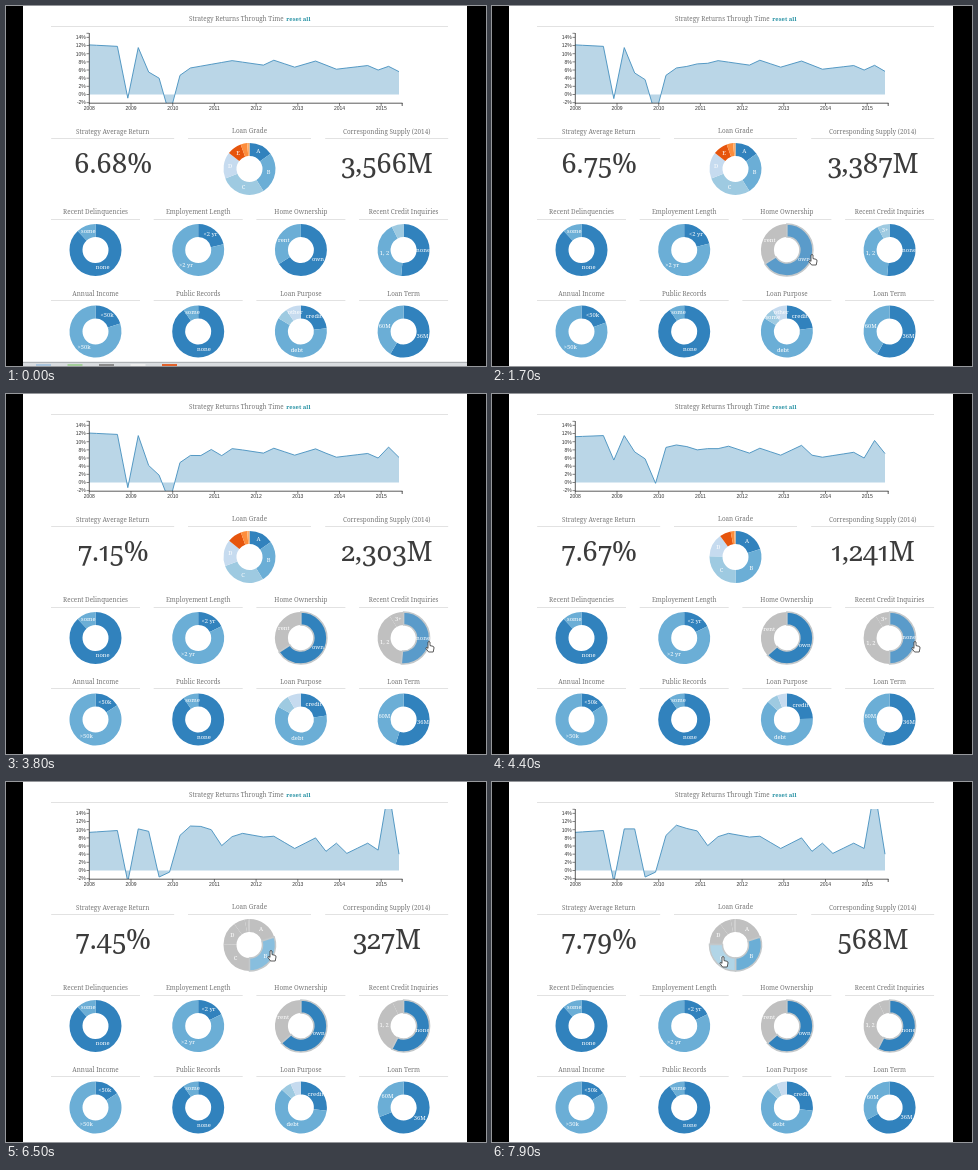
Recreate the animation shown at these times as an HTML page with a canvas. Size 480 by 360 pixels, loop 8000 ms.

```html
<!DOCTYPE html>
<html lang="en">
<head>
<meta charset="utf-8">
<title>Strategy dashboard</title>
<style>
  html, body { margin: 0; width: 100%; height: 100%; overflow: hidden; background: #000; }
  canvas { position: absolute; left: 0; top: 0; }
  .figure {
    position: absolute; top: 135.5px; width: 140px; text-align: center;
    font: 300 27.8px/40px "Noto Serif", serif; color: #3c3c3c;
    font-variant-numeric: oldstyle-nums proportional-nums;
  }
  #rate { left: 37.2px; }
  #supply { left: 311px; }
</style>
</head>
<body>
<canvas id="stage" width="480" height="360"></canvas>
<div class="figure" id="rate"></div>
<div class="figure" id="supply"></div>
<script>
const ctx = document.getElementById('stage').getContext('2d');
const rateBox = document.getElementById('rate');
const supplyBox = document.getElementById('supply');
const LOOP = 8000, STEP = 100, FADE = 750, HOVER_LAG = 200;
const SERIF = '"Noto Serif", serif', SANS = '"Liberation Sans", Arial, sans-serif';
const COLORS = ['#3182bd', '#6baed6', '#9ecae1', '#c6dbef', '#e6550d', '#fd8d3c', '#fdae6b'];
const RULE = '#e2e2e2', INK = '#333';
const PAGE = { x: 17, width: 444 };
const OUTER = 26, INNER = 13, QUARTERS = 31;

const gridPies = [
  ['late', 'Recent Delinquencies', 'none', 'some'],
  ['job', 'Employement Length', '<2 yr', '>2 yr'],
  ['home', 'Home Ownership', 'own', 'rent'],
  ['asks', 'Recent Credit Inquiries', 'none', '1, 2', '3+'],
  ['income', 'Annual Income', '<50k', '>50k'],
  ['record', 'Public Records', 'none', 'some'],
  ['purpose', 'Loan Purpose', 'credit', 'debt', 'some', 'other'],
  ['term', 'Loan Term', '36M', '60M'],
].map(([id, title, ...labels], i) => ({
  id, title, labels, width: 89,
  x: 89.5 + (i % 4) * 102.7,
  y: 244 + Math.floor(i / 4) * 81.5,
}));
const pies = [
  { id: 'grade', title: 'Loan Grade', labels: [...'ABCDEFG'], width: 123, x: 243.5, y: 163 },
  ...gridPies,
];

// A view holds the headline figures, the turning points of the return line
// (quarter: percent) and the inner slice boundaries of each pie.
const everything = {
  rate: 6.68, supply: 3566,
  line: { 0: 12.2, 3: 11.8, 4: -.9, 5: 11.5, 6: 5.5, 7: 4, 8: -5, 9: 4.7, 10: 6.5, 14: 8.3, 17: 7.2,
    18: 8.4, 20: 6.7, 22: 8.2, 24: 6.2, 27: 7.1, 28: 6, 29: 6.9, 30: 5.6 },
  cuts: { grade: [.15, .41, .69, .855, .945, .985], late: [.88], job: [.215], home: [.66],
    asks: [.515, .925], income: [.2], record: [.905], purpose: [.23, .835, .905], term: [.585] },
};
const refine = (base, changes) => ({
  ...base, ...changes,
  line: { ...base.line, ...changes.line },
  cuts: { ...base.cuts, ...changes.cuts },
});
const owners = refine(everything, {
  rate: 7.127, supply: 2356,
  line: { 4: -1.6, 6: 4, 7: 1.6, 11: 6.5, 12: 8.1, 13: 6.5, 29: 8.6, 30: 6.1 },
  cuts: { job: [.175], asks: [.515, .91], income: [.157], purpose: [.225, .83, .915], term: [.55] },
});
const careful = refine(owners, {
  rate: 7.67, supply: 1241,
  line: { 0: 11.2, 3: 11.5, 4: 5.5, 6: 7.5, 7: 5.8, 8: -.2, 9: 8.6, 10: 9.2, 11: 8.8, 12: 8, 13: 8.3,
    15: 8.9, 22: 9.1, 23: 6.7, 27: 7.4, 29: 10.3, 30: 7.1 },
  cuts: { grade: [.2, .5, .755, .9, .97, .992], home: [.635], asks: [.5, .91], purpose: [.245, .87, .94] },
});
const gradeB = refine(careful, {
  rate: 7.45, supply: 327,
  line: { 0: 9.3, 3: 9.8, 4: -2.8, 5: 10.2, 6: 9.6, 7: -1.6, 8: -.4, 10: 10.9, 11: 10.8, 12: 10, 13: 6.1,
    15: 9.1, 17: 8.2, 20: 5.4, 22: 8, 23: 4.7, 24: 6.7, 25: 4.2, 27: 6.7, 28: 5, 29: 20, 30: 4 },
  cuts: { asks: [.575, .93], purpose: [.27, .87, .935], term: [.69] },
});
const gradeBC = refine(gradeB, {
  rate: 7.79, supply: 568,
  line: { 6: 10.2, 10: 11.1, 11: 10.3, 12: 9.7, 28: 5.4 },
  cuts: { term: [.67] },
});

const clicks = [
  { at: -FADE, view: everything, chosen: {} },
  { at: 1450, view: owners, chosen: { home: [0] } },
  { at: 3629, view: careful, chosen: { home: [0], asks: [0] } },
  { at: 5750, view: gradeB, chosen: { home: [0], asks: [0], grade: [1] } },
  { at: 7150, view: gradeBC, chosen: { home: [0], asks: [0], grade: [1, 2] } },
];

// Pointer moves: start, end, and where the tip comes to rest.
const moves = [[100, 650, 320, 249], [2450, 3400, 423, 248], [5000, 5500, 257, 148],
  [5550, 5750, 265, 169], [6850, 7100, 231, 175]];

const mix = (a, b, p) => a + (b - a) * p;
const mixAll = (a, b, p) => a.map((v, i) => mix(v, b[i], p));
const progress = (t, from, to) => Math.min(1, Math.max(0, (t - from) / (to - from)));
const cubic = p => p < .5 ? 4 * p ** 3 : 1 - 4 * (1 - p) ** 3;
const sine = p => (1 - Math.cos(Math.PI * p)) / 2;

function pointerAt(t) {
  return moves.reduce((tip, [from, to, x, y]) => {
    const p = sine(progress(t, from, to));
    return { x: mix(tip.x, x, p), y: mix(tip.y, y, p) };
  }, { x: 190, y: 364 });
}

function quarterly(turns) {
  const at = Object.keys(turns).map(Number);
  return Array.from({ length: QUARTERS }, (_, q) => {
    const next = at.find(k => k >= q), last = at.findLast(k => k <= q);
    return next === last ? turns[q] : mix(turns[last], turns[next], (q - last) / (next - last));
  });
}

function write(text, x, y, font, color, align = 'center') {
  ctx.font = font;
  ctx.fillStyle = color;
  ctx.textAlign = align;
  ctx.fillText(text, x, y);
}

function segment(x0, y0, x1, y1, color, width = 1) {
  ctx.beginPath();
  ctx.moveTo(x0, y0);
  ctx.lineTo(x1, y1);
  ctx.strokeStyle = color;
  ctx.lineWidth = width;
  ctx.stroke();
}

function heading(text, x, y, width) {
  write(text, x, y, `6.33px ${SERIF}`, '#777');
  const rule = Math.floor(y + 5) + .5;
  segment(x - width / 2, rule, x + width / 2, rule, RULE);
}

function headings() {
  write('Strategy Returns Through Time', 183, 15.3, `6.33px ${SERIF}`, '#777', 'left');
  write('reset all', 304.5, 15.3, `bold 5.9px ${SERIF}`, '#2a93a5', 'right');
  segment(45, 20.5, 442, 20.5, RULE);
  heading('Strategy Average Return', 106.7, 127.5, 123);
  heading('Corresponding Supply (2014)', 380.7, 127.5, 123);
  for (const pie of pies) heading(pie.title, pie.x, pie.y - 35.6, pie.width);
}

function chart(line) {
  const level = v => 88.5 - v * 4.08;
  const px = q => 80.1 + 10.43 * q;
  const trace = () => line.forEach((v, q) => ctx.lineTo(px(q), level(v)));
  ctx.save();
  ctx.beginPath();
  ctx.rect(83, 27, 313, 70);
  ctx.clip();
  ctx.beginPath();
  ctx.moveTo(px(0), level(0));
  trace();
  ctx.lineTo(px(QUARTERS - 1), level(0));
  ctx.fillStyle = '#bad6e7';
  ctx.fill();
  ctx.beginPath();
  trace();
  ctx.strokeStyle = '#4690bf';
  ctx.lineWidth = .9;
  ctx.stroke();
  ctx.restore();

  segment(83.3, 27, 83.3, 97.5, INK, .8);
  segment(83, 97.2, 396.5, 97.2, INK, .8);
  segment(396.2, 97, 396.2, 100, INK, .8);
  segment(80.5, 27.3, 83, 27.3, INK, .6);
  for (let v = -2; v <= 14; v += 2) {
    const y = level(v);
    segment(80.5, y, 83, y, INK, .6);
    write(v + '%', 79.8, y + 1.8, `5px ${SANS}`, INK, 'right');
  }
  for (let k = 0; k < 8; k++) {
    const x = 83.3 + k * 41.7;
    segment(x, 97, x, 100, INK, .6);
    write(2008 + k, x, 104, `5px ${SANS}`, INK);
  }
}

const overPie = (pie, { x, y }) => {
  const r = Math.hypot(x - pie.x, y - pie.y);
  return r > INNER && r < OUTER;
};

function drawPie(pie, cuts, target, chosen, pointer) {
  const edges = [0, ...cuts, 1], goal = [0, ...target, 1];
  const turn = (Math.atan2(pointer.x - pie.x, pie.y - pointer.y) / (2 * Math.PI) + 1) % 1;
  const over = overPie(pie, pointer);
  const angle = f => (f - .25) * 2 * Math.PI;
  const slices = pie.labels.map((label, i) => ({
    label, i, a: edges[i], b: edges[i + 1],
    on: !!chosen && chosen.includes(i),
    roomy: goal[i + 1] - goal[i] >= .08,
  }));
  // Selected slices go last so their outline stays on top.
  for (const s of [...slices].sort((p, q) => p.on - q.on)) {
    ctx.beginPath();
    ctx.arc(pie.x, pie.y, OUTER, angle(s.a), angle(s.b));
    ctx.arc(pie.x, pie.y, INNER, angle(s.b), angle(s.a), true);
    ctx.closePath();
    ctx.globalAlpha = over && turn >= s.a && turn < s.b ? .8 : 1;
    ctx.fillStyle = chosen && !s.on ? '#c0c0c0' : COLORS[s.i];
    ctx.fill();
    ctx.globalAlpha = 1;
    if (s.on) {
      ctx.strokeStyle = '#c4c8ca';
      ctx.lineWidth = 1.5;
      ctx.stroke();
    }
  }
  for (const s of slices.filter(s => s.roomy)) {
    const mid = angle((s.a + s.b) / 2), reach = (OUTER + INNER) / 2;
    write(s.label, pie.x + reach * Math.cos(mid), pie.y + reach * Math.sin(mid) + 1.3,
      `500 5.8px ${SERIF}`, '#fff');
  }
}

function taskbar() {
  ctx.fillStyle = '#d9dcdf';
  ctx.fillRect(PAGE.x, 356, PAGE.width, 4);
  segment(PAGE.x, 356.3, PAGE.x + PAGE.width, 356.3, '#8d9296', .7);
  ['#a9c4dc', '#a5cf9b', '#8c8c8c', '#eee', '#e2622b'].forEach((color, i) => {
    ctx.fillStyle = color;
    ctx.fillRect(30 + i * 31.5, 358, 15, 2);
  });
}

function drawPointer({ x, y }, hand) {
  const path = new Path2D(hand
    ? 'M-1 0Q0-1 1 0V3.6L4 4.3Q5.2 4.7 5 6L4.2 10H-.4L-3 6.6Q-3.2 5.2-1.9 5.6L-1 6.4Z'
    : 'M0 0V8L1.9 6.3L3.2 9.2L4.4 8.7L3.1 5.8H5.6Z');
  ctx.save();
  ctx.translate(x, y);
  ctx.fillStyle = '#fff';
  ctx.fill(path);
  ctx.strokeStyle = INK;
  ctx.lineWidth = .8;
  ctx.stroke(path);
  ctx.restore();
}

function draw(t) {
  const n = clicks.findLastIndex(c => c.at <= t);
  const { at, view, chosen } = clicks[n];
  const from = clicks[Math.max(0, n - 1)].view;
  const p = cubic(progress(t, at, at + FADE));
  const pointer = pointerAt(t), hover = pointerAt(t - HOVER_LAG);

  ctx.fillStyle = '#000';
  ctx.fillRect(0, 0, 480, 360);
  ctx.fillStyle = '#fff';
  ctx.fillRect(PAGE.x, 0, PAGE.width, 360);
  headings();
  chart(mixAll(quarterly(from.line), quarterly(view.line), p));
  for (const pie of pies) {
    const target = view.cuts[pie.id];
    drawPie(pie, mixAll(from.cuts[pie.id], target, p), target, chosen[pie.id], hover);
  }
  if (t < 1100) taskbar();
  drawPointer(pointer, pies.some(pie => overPie(pie, pointer)));
  rateBox.textContent = mix(from.rate, view.rate, p).toFixed(2) + '%';
  supplyBox.textContent = Math.round(mix(from.supply, view.supply, p)).toLocaleString('en-US') + 'M';
}

const start = performance.now();
function tick() {
  let t = Math.floor(((performance.now() - start) % LOOP) / STEP) * STEP;
  // The screen hangs briefly after the third click.
  if (t > 5800 && t < 6300) t = 5800;
  draw(t);
  requestAnimationFrame(tick);
}
tick();
</script>
</body>
</html>
```
